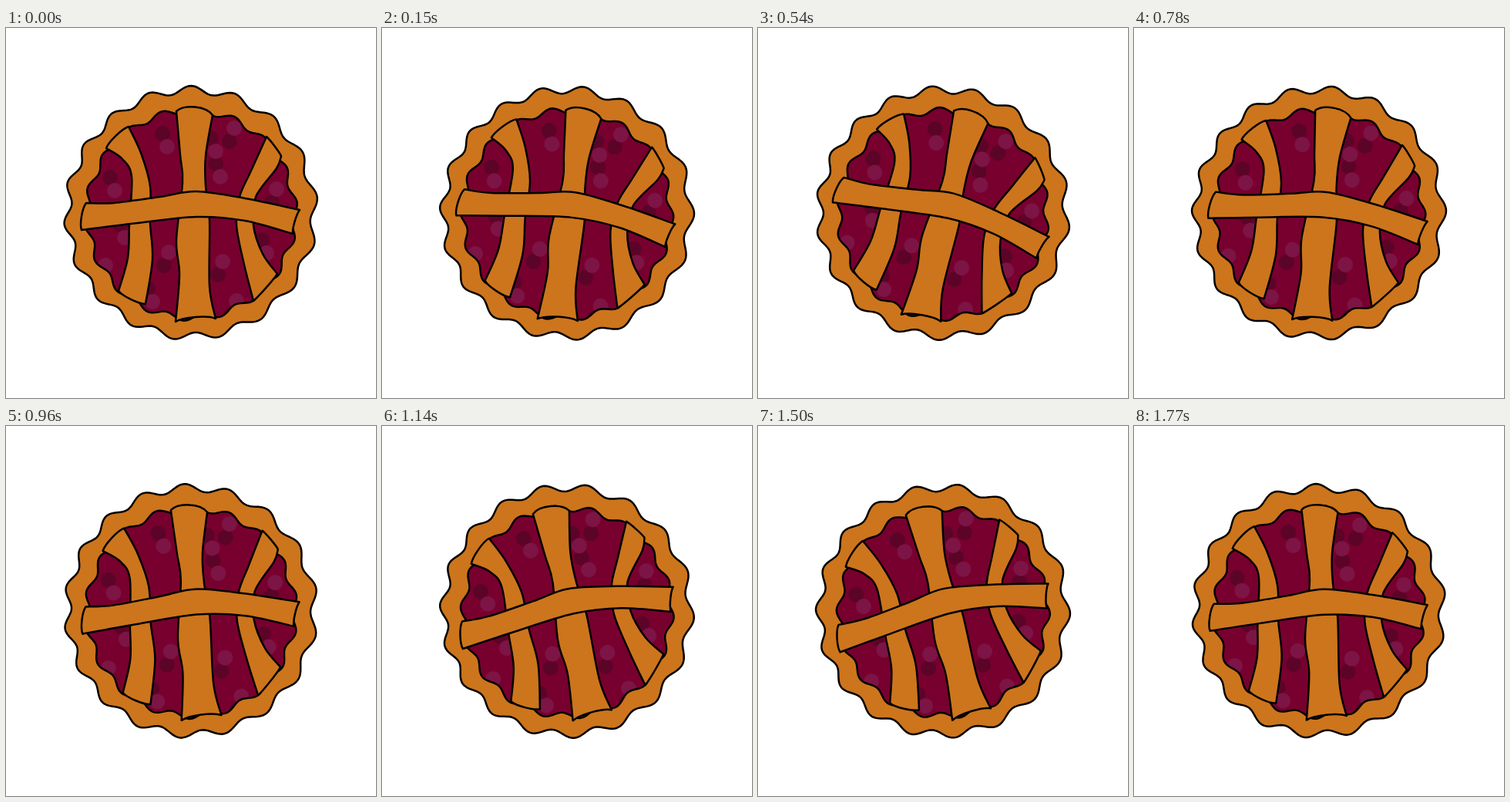
Animation of 480x480 px, one loop 1.8 s. Source, as an HTML page with a canvas:

```html
<!DOCTYPE html>
<html lang="en">
<head>
<meta charset="utf-8">
<title>Swinging pie</title>
<style>
  html, body { margin: 0; height: 100%; overflow: hidden; background: #fff; }
  canvas { display: block; }
</style>
</head>
<body>
<canvas id="stage" width="480" height="480"></canvas>
<script>
const ctx = document.getElementById('stage').getContext('2d');
const CRUST = '#cc751c', FILLING = '#78002e', DARK = '#5b0428', LIGHT = '#7c1445';
const LOOP = 1800, STEP = 30, SWING = 15, RAD = Math.PI / 180;

const points = text => text.split(' ').map(p => p.split(',').map(Number));

// Closed outline whose radius depends on the clockwise angle from the top
function blob(cy, radius) {
  const path = new Path2D();
  for (let deg = 0; deg < 360; deg++) {
    const a = deg * RAD, r = radius(deg);
    path.lineTo(240 + r * Math.sin(a), cy - r * Math.cos(a));
  }
  path.closePath();
  return path;
}

const wave = deg => Math.cos(18 * deg * RAD);
// The scallops crowd together slightly on one side
const rim = blob(240, deg => 160 + 5 * wave(deg - 4 + 4 * Math.cos((deg - 10) * RAD)));
const filling = blob(241.5, deg => 134.5 + 4 * wave(deg - 4));

// Smooth open curve from the current point through the rest
function edge(path, pts) {
  for (let i = 0; i < pts.length - 1; i++) {
    const b = pts[i], c = pts[i + 1], a = pts[i - 1] ?? b, d = pts[i + 2] ?? c;
    path.bezierCurveTo(
      b[0] + (c[0] - a[0]) / 6, b[1] + (c[1] - a[1]) / 6,
      c[0] - (d[0] - b[0]) / 6, c[1] - (d[1] - b[1]) / 6, ...c);
  }
}

// Strip end, bowed outward by the given height
function cap(path, [x, y], [u, v], bow) {
  const len = Math.hypot(u - x, v - y), k = bow * 4 / 3 / len;
  const at = f => [x + (u - x) * f + (v - y) * k, y + (v - y) * f - (u - x) * k];
  path.bezierCurveTo(...at(.2), ...at(.8), u, v);
}

function strip(left, right, startBow, endBow) {
  const path = new Path2D(), a = points(left), b = points(right).reverse();
  path.moveTo(...a[0]);
  edge(path, a);
  cap(path, a.at(-1), b[0], endBow);
  edge(path, b);
  cap(path, b.at(-1), a[0], startBow);
  path.closePath();
  return path;
}

const strips = [
  strip('130,156 151,170 163,193 160,253 158,298 146,341',
        '159,128 175,162 187,205 187,253 190,300 181,358', -3, -3),
  strip('221,108 226,165 229,200 221,275 225,320 220,381',
        '268,113 259,166 259,205 264,250 264,335 272,377', -8, 4),
  strip('338,141 318,185 303,219 299,256 309,307 321,354',
        '357,166 351,182 324,219 321,256 333,293 352,319', -1, -1),
  strip('104,227 140,227 200,219 247,212 310,221 381,236',
        '98,262 162,254 247,245 310,250 372,267', 3, -2)
];

const berries = points('209,154 296,130 278,193 281,303 190,355 211,291 338,292 ' +
  '351,209 154,272 129,308 141,211 299,354 272,160');
const shadows = berries.map(([x, y], i) => [x - 6, y + (i % 2 ? 17 : -17)]);

function dots(list, color) {
  ctx.fillStyle = color;
  for (const [x, y] of list) {
    ctx.beginPath();
    ctx.arc(x, y, 10, 0, 7);
    ctx.fill();
  }
}

function shape(path, color) {
  ctx.fillStyle = color;
  ctx.fill(path);
  ctx.stroke(path);
}

function draw(time) {
  const t = Math.floor(time % LOOP / STEP) * STEP;
  ctx.fillStyle = '#fff';
  ctx.fillRect(0, 0, 480, 480);
  ctx.save();
  ctx.translate(240, 240);
  ctx.rotate(SWING * RAD * Math.sin(2 * Math.PI * t / LOOP));
  ctx.translate(-240, -240);
  ctx.lineWidth = 2.5;
  ctx.lineJoin = 'round';
  shape(rim, CRUST);
  ctx.save();
  ctx.clip(filling);
  ctx.fillStyle = FILLING;
  ctx.fill(filling);
  dots(shadows, DARK);
  dots(berries, LIGHT);
  ctx.restore();
  ctx.stroke(filling);
  strips.forEach(s => shape(s, CRUST));
  ctx.restore();
}

const start = performance.now();
function tick() {
  draw(performance.now() - start);
  requestAnimationFrame(tick);
}
tick();
</script>
</body>
</html>
```
